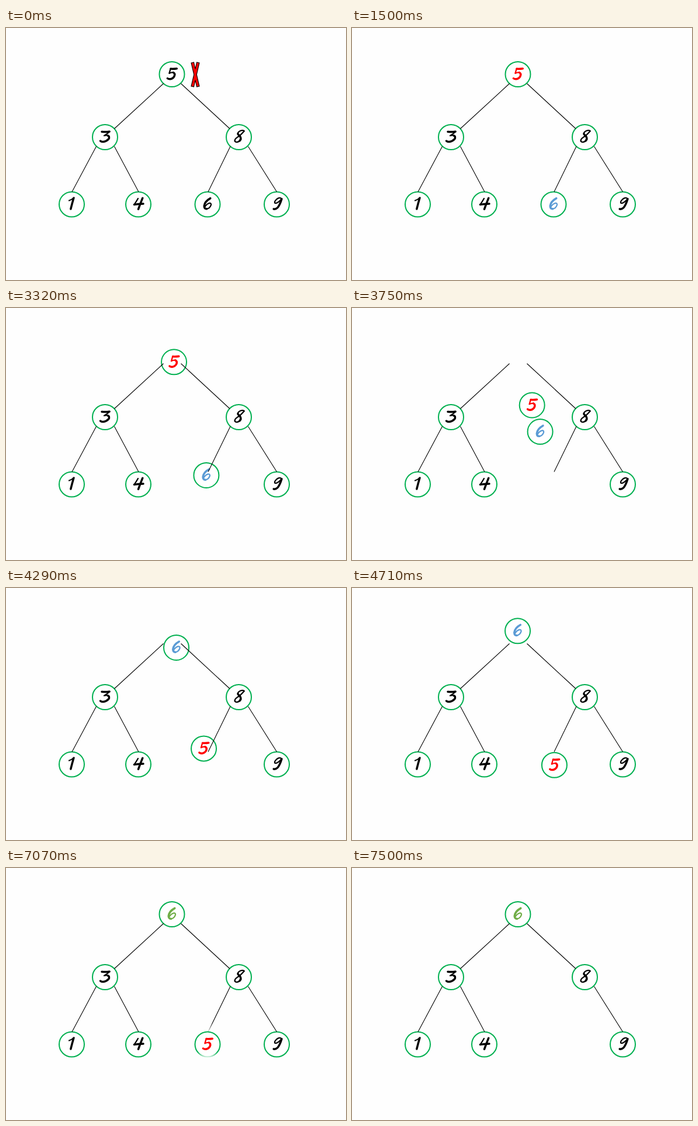
These frames come from a looping animation (582 by 433 pixels, 8 s). An HTML page:

```html
<!DOCTYPE html>
<html lang="en">
<head>
<meta charset="utf-8">
<title>Deleting a root node from a binary search tree</title>
<style>
  html, body { margin: 0; width: 100%; height: 100%; overflow: hidden; background: #fefefe; }
  svg { display: block; width: 582px; height: 433px; }
  circle { fill: #fff; stroke: #00b050; stroke-width: 2; }
  .edge { stroke: #000; stroke-width: 1.1; }
  .digit { fill: none; stroke-linecap: round; stroke-linejoin: round; }
</style>
</head>
<body>
<svg id="stage" viewBox="0 0 582 433" role="img" aria-label="Binary search tree"></svg>
<script>
const LOOP = 8000;
const RED = '#ff0000', BLUE = '#5b9bd5', GREEN = '#70ad47', BLACK = '#000';
const ROOT = [284, 79.5], LEAF = [345, 303];
const SLIDE = [2920, 3070, 3195, 3320, 3470, 3600, 3750, 3890, 4020, 4170, 4290, 4440, 4560, 4710, 4860];
const WIPE = [7070, 7200, 7350, 7500];

// Brush digits around the node centre: [fine strokes, heavy strokes]
const GLYPHS = {
  1: ['M-4.5-6.5Q0-8 4-11.5', 'M3.3-10.8Q.5-1-1.7 8'],
  3: ['M8-9.5Q3-5-1.5-2.5Q4-4 7-1.5',
      'M-5.5-9.3Q1-8.5 7.5-9.5M5-2.5Q8.5 0 6 3.5Q2 7.5-3 8Q-6 8.5-8 6.5'],
  4: ['M-.5-10Q-4-4-7 .3', 'M-7 .4Q0-.9 8.5-1M7.3-10.8Q3 0 0 8.3'],
  5: ['M-2.3-9.5L-4.6-1.6Q-1-3.6 2.5-3',
      'M-2-9.5Q3-9 8.3-9.8M2.5-3Q6.3-1 3.8 4Q1 8.2-3.5 8.3Q-6 8.3-7.6 7'],
  6: ['M-1.5 8Q4 7 6 1Q6.4-2.5 3-2Q-1-1-4.5 4', 'M4.8-10.4Q-5-5-5.8 3Q-5.5 8-1.5 7.8'],
  8: ['M9.3-10.5Q7-12.5 3-11Q-3-8-1.5-5M1.5 6.5Q-3 10-6.3 7.6Q-8.3 4-3 .6Q3-3 9.3-10.5',
      'M-1.5-5.5Q0-3 2.4-.9Q4.8 3 1.5 6.3'],
  9: ['M8.5-9.5Q5-13 0-9Q-5-4.5-3-2Q1-1 8-9', 'M8.4-9.3Q5 2 1 6Q-2 8.8-5.3 8']
};

const stage = document.getElementById('stage');

function add(parent, tag, attrs) {
  const el = document.createElementNS('http://www.w3.org/2000/svg', tag);
  set(el, attrs);
  return parent.appendChild(el);
}

function set(el, attrs) {
  for (const name in attrs) el.setAttribute(name, attrs[name]);
}

function addNode(value, x, y) {
  const g = add(stage, 'g', { 'aria-label': value });
  add(g, 'circle', { r: 21.5 });
  const digit = add(g, 'g', { class: 'digit' });
  GLYPHS[value].forEach((d, i) => add(digit, 'path', { d, 'stroke-width': i ? 3.5 : 2.3 }));
  const node = { g, digit };
  place(node, [x, y], BLACK);
  return node;
}

function place(node, [x, y], color) {
  set(node.g, { transform: `translate(${x} ${y})` });
  set(node.digit, { stroke: color });
}

function addEdge(x1, y1, x2, y2, parent = stage) {
  return add(parent, 'line', { class: 'edge', x1, y1, x2, y2 });
}

// Soft-edged wipe, running upwards over the rows top..bottom
function addWipe(id, el, top, bottom) {
  const gradient = add(stage, 'linearGradient',
    { id: id + 'Fade', gradientUnits: 'userSpaceOnUse', x1: 0, x2: 0 });
  add(gradient, 'stop', { offset: 0, 'stop-color': '#000' });
  add(gradient, 'stop', { offset: 1, 'stop-color': '#fff' });
  const area = { x: 0, y: 0, width: 582, height: 433 };
  const mask = add(stage, 'mask', { id, maskUnits: 'userSpaceOnUse', ...area });
  add(mask, 'rect', { ...area, fill: `url(#${id}Fade)` });
  return lead => {
    const row = part => bottom - part * (bottom - top);
    set(gradient, { y1: row(lead - 0.23), y2: row(lead) });
    if (lead > 0) set(el, { mask: `url(#${id})` });
    else el.removeAttribute('mask');
    set(el, { visibility: lead >= 1.23 ? 'hidden' : 'visible' });
  };
}

addNode(3, 169.5, 187.5);
addNode(8, 398.5, 187.5);
addNode(1, 112.5, 303);
addNode(4, 226.5, 303);
addNode(9, 463.5, 303);
const fiveLayer = add(stage, 'g', {});
const five = addNode(5, ...ROOT);
fiveLayer.appendChild(five.g);
const six = addNode(6, ...LEAF);

addEdge(269.5, 95.5, 185.5, 173);
addEdge(299.5, 95.5, 383, 173);
addEdge(154.5, 203.5, 113, 281.5);
addEdge(185.5, 203.5, 227, 281.5);
addEdge(414.5, 203.5, 463.5, 281.5);
const edgeLayer = add(stage, 'g', {});
addEdge(384, 203.5, 346, 281.5, edgeLayer);

const cross = add(stage, 'path', {
  d: 'M317 60L321.5 59L324 70.5L326.5 59L331 60L326.3 80L331 100L326.5 101L324 89.5L321.5 101L317 100L321.7 80Z',
  fill: RED, stroke: BLACK, 'stroke-width': 1.1
});

const wipes = [
  addWipe('nodeWipe', fiveLayer, 280, 326),
  addWipe('edgeWipe', edgeLayer, 203, 282)
];

const lastStep = (times, t) => times.filter(s => s <= t).pop();
const mix = (a, b, p) => a.map((v, i) => v + (b[i] - v) * p);

function ease(u) {
  u = Math.min(1, Math.max(0, u));
  return u * u * u * (10 - 15 * u + 6 * u * u);
}

function draw(t) {
  const marked = t >= 1500, sliding = t >= 2920, settled = t >= 5610;
  let fiveAt = ROOT, sixAt = LEAF;
  if (settled) {
    [fiveAt, sixAt] = [LEAF, ROOT];
  } else if (sliding) {
    const p = ease((lastStep(SLIDE, t) - 2910) / 1890);
    fiveAt = mix([283, 76.5], [346.5, 304.5], p);
    sixAt = mix([347.5, 304], [283.5, 73.5], p);
  }
  place(five, fiveAt, marked ? RED : BLACK);
  place(six, sixAt, settled ? GREEN : marked ? BLUE : BLACK);
  set(cross, { visibility: marked ? 'hidden' : 'visible' });

  const step = lastStep(WIPE, t);
  const lead = step ? 0.21 + (step - WIPE[0]) / 302 : 0;
  wipes.forEach(wipe => wipe(lead));
}

const start = performance.now();
function tick() {
  draw((performance.now() - start) % LOOP);
  requestAnimationFrame(tick);
}
tick();
</script>
</body>
</html>
```
